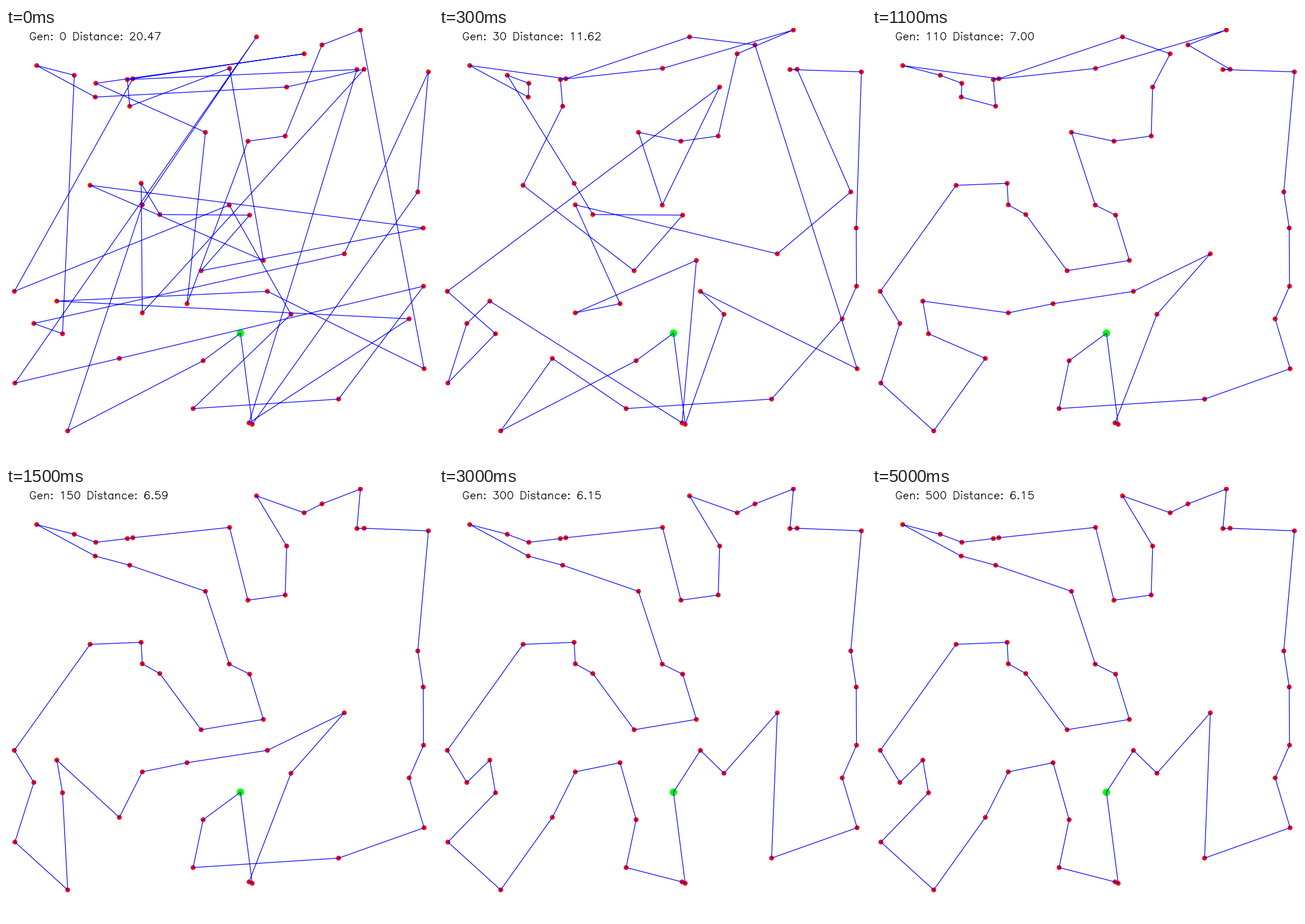
A matplotlib script that plays this animation: 744x752 px, repeating every 5.1 s.

```python
import math

import matplotlib.pyplot as plt
import numpy as np
from matplotlib.animation import FuncAnimation
from matplotlib.patches import Circle

W, H, DPI = 744, 752, 100
PX = 72 / DPI
FRAMES, INTERVAL = 51, 100

# Cities, listed in the order of the best tour
CITIES = np.array([
    (408, 532), (455, 459), (496, 499), (589, 393.5), (579, 647),
    (728, 594), (702, 507), (727, 450), (726.5, 348.5), (717, 285.5),
    (735.5, 76), (623.5, 71.5), (611, 72), (617, 3), (550, 29),
    (519, 44.5), (436, 15), (488.5, 102.5), (486, 188), (421, 197),
    (389, 70), (220.5, 88), (211, 89.5), (156, 96), (118.5, 82),
    (53, 65), (155, 120), (215, 136), (347, 181.5), (388.5, 308.5),
    (424, 326), (448, 405), (339.5, 423), (267.5, 325), (237, 308),
    (235, 270.5), (146, 274), (14, 459), (48, 515), (88, 476),
    (98, 533), (15, 619), (107, 702.5), (197, 576), (237, 496.5),
    (315, 480.5), (343, 580), (325.5, 663.5), (423, 688.5), (428.5, 691),
])
DIST = np.hypot(*(CITIES[:, None] - CITIES[None]).transpose(2, 0, 1)).tolist()

# Tours at the moments where the search settles
START = [0, 46, 42, 34, 16, 41, 43, 7, 4, 47, 2, 29, 37, 21, 15, 23, 28,
         45, 19, 18, 14, 13, 5, 1, 39, 6, 48, 12, 22, 27, 20, 31, 36, 8,
         32, 30, 33, 35, 44, 11, 17, 26, 25, 24, 40, 38, 3, 10, 9, 49]
ROUGH = [0, 46, 42, 43, 47, 4, 6, 7, 8, 10, 12, 11, 9, 3, 34, 45, 44,
         31, 48, 39, 38, 41, 40, 37, 17, 29, 28, 19, 18, 15, 13, 20, 22, 27,
         36, 32, 30, 33, 35, 24, 23, 26, 25, 21, 16, 14, 5, 1, 2, 49]
FAIR = [0, 46, 42, 43, 47, 4, 3, 2, 1, 32, 31, 45, 44, 39, 38, 41, 40,
        37, 36, 34, 35, 33, 30, 29, 28, 19, 18, 17, 15, 13, 20, 22, 27, 26,
        23, 24, 25, 21, 16, 14, 11, 12, 10, 9, 8, 7, 6, 5, 48, 49]
GOOD = [0, 46, 47, *range(4, 39), 41, 42, 40, 39, 43, 44, 45, 1, 3, 2, 48, 49]
BEST = list(range(50))

STAGES = [(0, START, 20.47), (3, ROUGH, 11.62), (7, FAIR, 7.77),
          (15, GOOD, 6.59), (18, GOOD, 6.59), (22, BEST, 6.15)]


def edges(tour):
    return list(zip(tour, tour[1:] + tour[:1]))


def length(tour):
    return sum(DIST[a][b] for a, b in edges(tour))


def improve(tour, goal):
    """Best shortening reversal that brings in edges of the goal, or None."""
    n, best = len(tour), None
    for i in range(1, n):
        p, q = tour[i - 1], tour[i]
        for j in range(i + 1, n + 1):
            r, s = tour[j - 1], tour[j % n]
            gain = (((p, r) in goal) + ((q, s) in goal)
                    - ((p, q) in goal) - ((r, s) in goal))
            if gain <= 0:
                continue
            cost = DIST[p][r] + DIST[q][s] - DIST[p][q] - DIST[r][s]
            if cost < 0 and (best is None or (gain, -cost) > best[0]):
                best = (gain, -cost), i, j
    if best is None:
        return None
    _, i, j = best
    return tour[:i] + tour[i:j][::-1] + tour[j:]


def walk(a, b):
    """Tours that lead from a towards b, one reversal at a time."""
    goal = {e for x, y in edges(b) for e in ((x, y), (y, x))}
    path = [a]
    while (nxt := improve(path[-1], goal)) is not None:
        path.append(nxt)
    return path


def build_states():
    states = []
    for (f0, a, da), (f1, b, db) in zip(STAGES, STAGES[1:]):
        path, la, lb = walk(a, b), length(a), length(b)
        rate = (da - db) / (la - lb) if la != lb else 0
        for k in range(f1 - f0):
            tour = path[k * len(path) // (f1 - f0)]
            states.append((tour, db + (length(tour) - lb) * rate))
    last = STAGES[-1]
    return states + [last[1:]] * (FRAMES - len(states))


# Single-stroke lettering: cap height 21, baseline 0
def arc(cx, cy, rx, ry, a, b):
    t = np.radians(np.linspace(a, b, 2 + round(abs(b - a) / 20)))
    return [(cx + rx * math.cos(u), cy + ry * math.sin(u)) for u in t]


def dot(x, y):
    return arc(x, y, 1, 1, 0, 360)


BOWL = arc(9.5, 7, 6.5, 7, 38, 322)
SIX = arc(11.5, 10, 7.5, 11, 50, 180) + arc(10.5, 6.5, 6.5, 6.5, 180, 540)

# Advance width and strokes of each letter
GLYPHS = {
    " ": (16, []),
    ".": (10, [dot(5, 1)]),
    ":": (10, [dot(5, 13), dot(5, 1)]),
    "G": (21, [arc(11, 10.5, 8, 10.5, 32, 330) + [(18, 8), (13, 8)]]),
    "D": (21, [[(4, 0), (4, 21), (10, 21)]
               + arc(10, 10.5, 8, 10.5, 90, -90) + [(4, 0)]]),
    "a": (19, [[(15, 14), (15, 0)], BOWL]),
    "c": (18, [BOWL]),
    "e": (18, [[(3, 8)] + arc(9.3, 7, 6.2, 7, 8, 320)]),
    "i": (8, [dot(4, 21), [(4, 14), (4, 0)]]),
    "n": (19, [[(4, 14), (4, 0)],
               [(4, 10), (7, 13), (9, 14), (12, 14), (14, 13), (15, 10),
                (15, 0)]]),
    "s": (17, [arc(8.5, 10.75, 5.4, 3.25, 12, 245)
               + arc(8.5, 3.75, 5.5, 3.75, 65, -170)]),
    "t": (12, [[(5, 21), (5, 4), (6, 1), (8, 0), (10, 0)],
               [(2, 14), (9, 14)]]),
    "0": (20, [arc(10, 10.5, 7, 10.5, 0, 360)]),
    "1": (20, [[(6, 17), (8, 18), (11, 21), (11, 0)]]),
    "2": (20, [arc(10, 15.5, 6, 5.5, 175, -30)
               + [(13, 10), (3, 0), (17, 0)]]),
    "3": (20, [[(5, 21), (16, 21), (10, 13)]
               + arc(10, 6.5, 7, 6.5, 90, -155)]),
    "4": (20, [[(13, 0), (13, 21), (3, 7), (18, 7)]]),
    "5": (20, [[(15, 21), (5, 21), (4, 12)] + arc(10, 7, 7, 7, 130, -155)]),
    "6": (20, [SIX]),
    "7": (20, [[(3, 21), (17, 21), (7, 0)]]),
    "8": (20, [arc(10, 16.75, 6, 4.25, 0, 360),
               arc(10, 6.25, 7, 6.25, 0, 360)]),
    "9": (20, [[(20 - x, 21 - y) for x, y in SIX]]),
}


def lettering(text, x=40.3, y=20.9, size=0.626):
    points = []
    for ch in text:
        width, strokes = GLYPHS[ch]
        for stroke in strokes:
            points += [(x + size * u, y - size * v) for u, v in stroke]
            points.append((np.nan, np.nan))
        x += size * width
    return np.array(points).T


STATES = build_states()

fig = plt.figure(figsize=(W / DPI, H / DPI), dpi=DPI, facecolor="white")
ax = fig.add_axes([0, 0, 1, 1])
ax.set_xlim(0, W)
ax.set_ylim(H, 0)
ax.axis("off")

SPOTS = CITIES + 0.5
for n, spot in enumerate(SPOTS):
    ax.add_patch(Circle(spot, 4.2 if n else 6.5, lw=0, zorder=1,
                        color="#ff0000" if n else "#00ff00"))

route, = ax.plot([], [], color="#0000ff", lw=1.25 * PX, zorder=2, snap=False)
label, = ax.plot([], [], color="black", lw=1.25 * PX, zorder=3, snap=False)


def update(frame):
    tour, dist = STATES[frame]
    route.set_data(*SPOTS[tour + tour[:1]].T)
    label.set_data(*lettering(f"Gen: {frame * 10} Distance: {dist:.2f}"))
    return route, label


anim = FuncAnimation(fig, update, frames=FRAMES, interval=INTERVAL,
                     repeat=True, repeat_delay=0)
plt.show()
```
